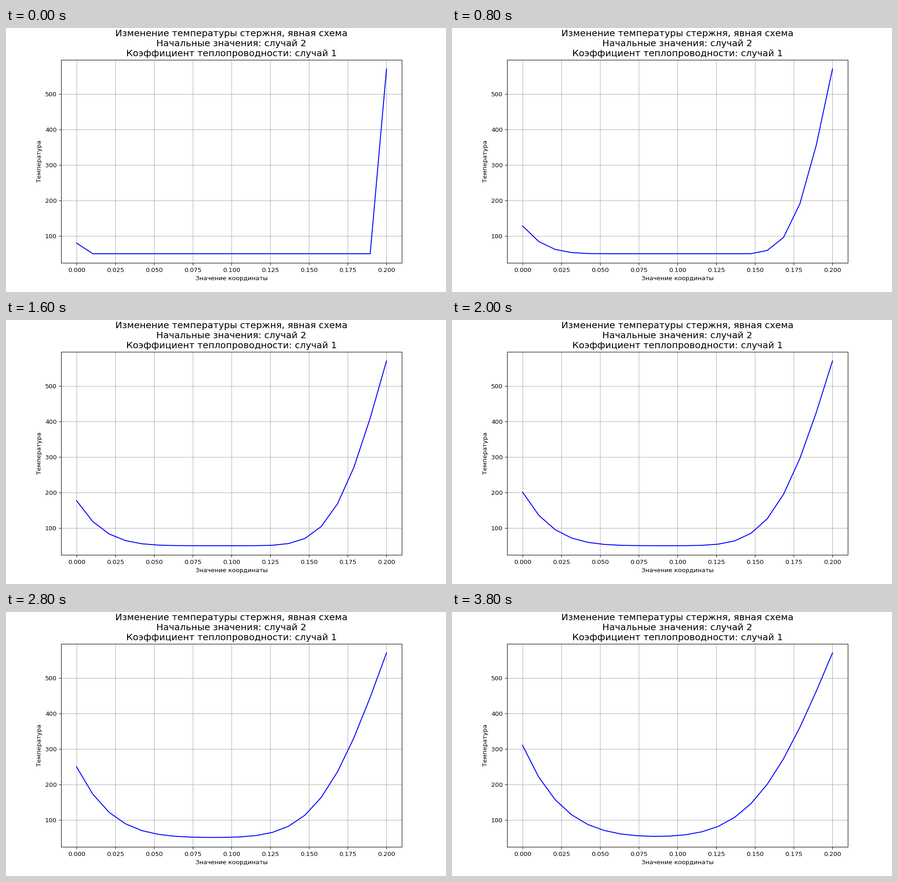
A matplotlib script that plays this animation: 966x580 px, repeating every 4 s.

```python
import numpy as np
import matplotlib.pyplot as plt
from matplotlib.animation import FuncAnimation

plt.rcParams["font.family"] = "DejaVu Sans"

WIDTH, HEIGHT, DPI = 966, 580, 96.6
LENGTH, DURATION = 0.2, 60.0
NODES = STEPS = 20
CONDUCTIVITY, HEAT_CAPACITY, DENSITY = 46, 460, 7800


def solve():
    """Explicit scheme for the heat equation; one row per time step."""
    dx = LENGTH / (NODES - 1)
    dt = DURATION / (STEPS - 1)
    r = CONDUCTIVITY / (HEAT_CAPACITY * DENSITY) * dt / dx**2
    temp = np.full((STEPS, NODES), 50.0)
    temp[:, 0] = np.linspace(80, 310, STEPS)
    temp[:, -1] = 570
    for n in range(STEPS - 1):
        u = temp[n]
        temp[n + 1, 1:-1] = u[1:-1] + r * (u[2:] - 2 * u[1:-1] + u[:-2])
    return temp


x = np.linspace(0, LENGTH, NODES)
temp = solve()

# The small margin keeps rounding from losing a pixel.
fig, ax = plt.subplots(figsize=((WIDTH + 0.01) / DPI, (HEIGHT + 0.01) / DPI),
                       dpi=DPI)
line, = ax.plot(x, temp[0], color="b")
ax.set_xlim(-0.01, 0.21)
ax.set_ylim(24, 596)
ax.grid(True)
ax.set_title("Изменение температуры стержня, явная схема\n"
             "Начальные значения: случай 2\n"
             "Коэффициент теплопроводности: случай 1", fontsize=15)
ax.set_xlabel("Значение координаты")
ax.set_ylabel("Температура")


def update(n):
    line.set_ydata(temp[n])
    return line,


anim = FuncAnimation(fig, update, frames=STEPS, interval=200,
                     repeat=True, repeat_delay=0)
plt.show()
```
